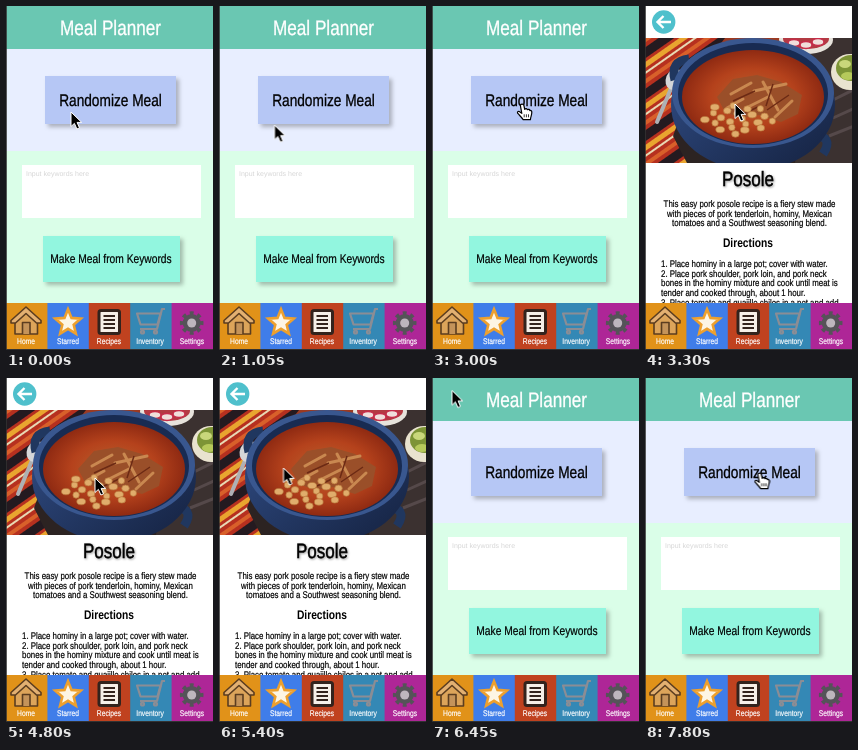
An HTML page that plays this animation: 207x344 px, repeating every 8000 ms.

```html
<!DOCTYPE html>
<html lang="en">
<head>
<meta charset="utf-8">
<title>Meal Planner</title>
<style>
  html, body { margin: 0; width: 100%; height: 100%; overflow: hidden; background: #fff; }
  svg { display: block; width: 100vw; height: 100vh; }

  /* One condensed, slightly heavier cut for all interface type */
  text {
    font-family: "Liberation Sans", Arial, sans-serif;
    text-anchor: middle;
    text-rendering: geometricPrecision;
    stroke: #000;
    stroke-width: .2px;
    transform: scaleX(.82);
    transform-box: fill-box;
    transform-origin: center;
  }
  .title { font-size: 20.9px; fill: #fff; stroke: #fff; stroke-width: .35px; }
  .label { font-size: 16.7px; stroke-width: .3px; }
  .small { font-size: 12.5px; }
  .hint { font-size: 7px; fill: #d6d6d6; stroke: none; text-anchor: start; transform: none; }
  .dish { font-size: 20.7px; stroke-width: .5px; filter: drop-shadow(1.5px 1.5px 1px #0006); }
  .head { font-size: 12.5px; font-weight: bold; stroke: none; }
  .copy text { font-size: 9.6px; }
  .steps text { text-anchor: start; transform-origin: left; }
  .tabs text { font-size: 8.2px; fill: #fff; stroke: #fff; }
  .button { filter: drop-shadow(3px 3px 2px #0004); }

  #recipe, #hand, #arrow, #cursor { animation: 8s -2ms infinite step-end; }
  #recipe { animation-name: recipe; }
  #hand { animation-name: hand; }
  #arrow { animation-name: arrow; }
  #cursor { animation-name: move; }

  @keyframes recipe {
    0%, 80.625%, 100% { visibility: hidden; }
    41.25% { visibility: visible; }
  }
  @keyframes hand {
    0%, 41.25%, 80.625%, 100% { visibility: hidden; }
    15%, 75%, 95.625% { visibility: visible; }
  }
  @keyframes arrow {
    0%, 41.25%, 80.625%, 100% { visibility: visible; }
    15%, 75%, 95.625% { visibility: hidden; }
  }
  /* The pointer is sampled every 150 ms */
  @keyframes move {
    0% { transform: translate(65px, 106px); }
    1.875% { transform: translate(65px, 106px); animation-timing-function: steps(4, start); }
    9.375% { transform: translate(55.5px, 122.5px); }
    13.125% { transform: translate(55.5px, 122.5px); animation-timing-function: steps(6, start); }
    24.375% { transform: translate(55.5px, 102.5px); }
    28.125% { transform: translate(55.5px, 102.5px); animation-timing-function: steps(2, start); }
    31.875% { transform: translate(68px, 103.5px); animation-timing-function: steps(4, start); }
    39.375% { transform: translate(90px, 98px); }
    60% { transform: translate(89px, 100px); }
    61.875% { transform: translate(89px, 100px); animation-timing-function: steps(2, start); }
    65.625% { transform: translate(86px, 130px); animation-timing-function: steps(4, start); }
    73.125% { transform: translate(43px, 50px); animation-timing-function: steps(2, start); }
    76.875% { transform: translate(20.5px, 15.5px); }
    80.625% { transform: translate(20px, 12.5px); }
    88.125% { transform: translate(20px, 12.5px); animation-timing-function: steps(6, start); }
    99.375%, 100% { transform: translate(114.5px, 95px); }
  }
</style>
</head>
<body>
<svg viewBox="0 0 207 344" preserveAspectRatio="none">
  <defs>
    <clipPath id="photo"><path d="M0 32H207V157H0Z"/></clipPath>
    <radialGradient id="stew">
      <stop offset="0" stop-color="#b9632f"/>
      <stop offset=".6" stop-color="#b5421c"/>
      <stop offset="1" stop-color="#8f2a12"/>
    </radialGradient>
    <linearGradient id="pot" x2="1" y2="1">
      <stop offset="0" stop-color="#33508a"/>
      <stop offset="1" stop-color="#14213f"/>
    </linearGradient>
    <pattern id="cloth" width="34" height="34" patternUnits="userSpaceOnUse" patternTransform="rotate(-35)">
      <path fill="#b6301f" d="M0 0H34V34H0Z"/>
      <path fill="#241a20" d="M0 0H34V9H0Z"/>
      <path fill="#e9a52f" d="M0 12H34V17H0Z"/>
      <path fill="#e8d9b4" d="M0 20H34V22H0Z"/>
      <path fill="#d8602a" d="M0 26H34V30H0Z"/>
    </pattern>
  </defs>

  <g id="home">
    <path fill="#6ac7b2" d="M0 0H207V43H0Z"/>
    <path fill="#e8eeff" d="M0 43H207V146H0Z"/>
    <path fill="#dafee8" d="M0 145H207V298H0Z"/>
    <text class="title" x="104.5" y="29">Meal Planner</text>
    <path class="button" fill="#b6c7f5" d="M39 70H170V118H39Z"/>
    <text class="label" x="104.5" y="100">Randomize Meal</text>
    <path fill="#fff" d="M16 159H195V212H16Z"/>
    <text class="hint" x="20" y="170">Input keywords here</text>
    <path class="button" fill="#92f6df" d="M37 230H174V276H37Z"/>
    <text class="small" x="105" y="256.7">Make Meal from Keywords</text>
  </g>

  <g id="recipe">
    <path fill="#fff" d="M0 0H207V298H0Z"/>
    <circle cx="18.7" cy="16" r="11.7" fill="#4fc0cc"/>
    <path d="M18.5 10L12.5 16l6 6M12.5 16H26" fill="none" stroke="#fff" stroke-width="2.4"/>

    <g clip-path="url(#photo)">
      <path fill="#2c2322" d="M0 32H207V157H0Z"/>
      <path fill="url(#cloth)" d="M0 32H82L48 75 28 130 42 157H0Z"/>
      <path fill="#3b3130" d="M165 32H207V157H150Z"/>
      <path fill="#9c3a22" d="M80 32H140L150 45H70Z"/>
      <path fill="none" stroke="#55494a" stroke-width="3" d="M186 95L212 82M188 112L212 101M184 130L212 119"/>
      <ellipse cx="161" cy="34" rx="27" ry="14" fill="#e7e3dc"/>
      <ellipse cx="161" cy="33" rx="23" ry="10" fill="#b33a43"/>
      <g fill="#f0dedb" stroke="#c72c4a" stroke-width="1.5">
        <ellipse cx="149" cy="37" rx="6" ry="3.5"/>
        <ellipse cx="161" cy="39" rx="6" ry="3.5"/>
        <ellipse cx="173" cy="36" rx="6" ry="3.5"/>
      </g>
      <ellipse cx="205" cy="66" rx="19" ry="18" fill="#e9e3cf"/>
      <ellipse cx="206" cy="62" rx="15" ry="13" fill="#7d9436"/>
      <ellipse cx="200" cy="58" rx="6" ry="4" fill="#c9d77b"/>
      <ellipse cx="203" cy="70" rx="7" ry="4" fill="#b6c95b"/>
      <path stroke="#aeb0b4" stroke-width="4" stroke-linecap="round" d="M27 80L12 116"/>
      <ellipse cx="29" cy="73" rx="8" ry="11" fill="#d5d6d8" transform="rotate(22 29 73)"/>

      <path fill="none" stroke="#20375f" stroke-width="9" d="M44 53Q25 55 30 74M166 128Q190 130 178 148"/>
      <ellipse cx="108" cy="99" rx="82" ry="65" fill="url(#pot)"/>
      <ellipse cx="108" cy="87" rx="81" ry="55" fill="#39578f"/>
      <ellipse cx="108" cy="88" rx="75" ry="51" fill="#182b52"/>
      <ellipse cx="108" cy="91" rx="71" ry="47" fill="url(#stew)"/>
      <path fill="#9a4f29" d="M72 91L88 73 112 69 136 76 157 89 153 108 136 116 114 109 96 112 80 106Z"/>
      <path fill="none" stroke="#c98850" stroke-width="3" stroke-linecap="round" d="M86 88l20-11M109 85l32-7M103 101l22-11M130 111l17-16M118 76l15 28M82 102l16-9"/>
      <path fill="none" stroke="#6c2a14" stroke-width="1.5" d="M88 95l22-10M122 104l22-15M128 78l-7 22M98 108l17-8"/>
      <g id="corn" fill="#e0ad6c" stroke="#b9773b" stroke-width=".7"></g>
    </g>

    <text class="dish" x="103" y="180">Posole</text>
    <g class="copy">
      <text x="104.5" y="201">This easy pork posole recipe is a fiery stew made</text>
      <text x="104.5" y="210.7">with pieces of pork tenderloin, hominy, Mexican</text>
      <text x="104.5" y="220.4">tomatoes and a Southwest seasoning blend.</text>
    </g>
    <text class="head" x="103" y="241">Directions</text>
    <g class="copy steps">
      <text x="16" y="261">1. Place hominy in a large pot; cover with water.</text>
      <text x="16" y="270.7">2. Place pork shoulder, pork loin, and pork neck</text>
      <text x="16" y="280.4">bones in the hominy mixture and cook until meat is</text>
      <text x="16" y="290.1">tender and cooked through, about 1 hour.</text>
      <text x="16" y="299.8">3. Place tomato and guajillo chiles in a pot and add</text>
    </g>
  </g>

  <g class="tabs">
    <path fill="#e19219" d="M0 297H42V344H0Z"/>
    <path fill="#3f7de9" d="M41.4 297H83V344H41.4Z"/>
    <path fill="#c0421f" d="M82.8 297H125V344H82.8Z"/>
    <path fill="#3488b5" d="M124.2 297H166V344H124.2Z"/>
    <path fill="#ae2697" d="M165.6 297H207V344H165.6Z"/>

    <g stroke="#5b3d20" stroke-width="1.6" stroke-linejoin="round">
      <path fill="#dca45a" d="M9 314V328H31.5V314L20 303Z"/>
      <path fill="#e3b071" d="M5 314.5L20 301 35 314.5V317H30.5L20 307.500 9.500 317H5Z"/>
      <path fill="#c4935a" d="M16.500 328V316.500H24V328"/>
    </g>
    <path id="star" fill="#fdf5e4" stroke="#eda02e" stroke-width="2.6"/>
    <rect x="93" y="304.500" width="20.500" height="23" rx="2" fill="#f6efe8" stroke="#33231d" stroke-width="3"/>
    <path d="M97.500 310H109M97.500 314H109M97.500 318H109M97.500 322H109" stroke="#33231d" stroke-width="1.800"/>
    <g fill="none" stroke="#8b8d95" stroke-width="2.200" stroke-linejoin="round">
      <path d="M131 307.500H154.500L151.500 318.500H134.500Z"/>
      <path d="M159 303H156L151 323H134"/>
      <circle cx="136.500" cy="326" r="1.500"/>
      <circle cx="149.500" cy="326" r="1.500"/>
    </g>
    <g fill="none" stroke="#555358">
      <circle cx="185.700" cy="317" r="9.800" stroke-width="4" pathLength="80" stroke-dasharray="5 5" stroke-dashoffset="2.500"/>
      <circle cx="185.700" cy="317" r="6.500" stroke-width="5"/>
      <circle cx="185.700" cy="317" r="4.500" fill="#bdb6bd" stroke="none"/>
    </g>

    <text x="20" y="337.800">Home</text>
    <text x="62" y="337.800">Starred</text>
    <text x="103" y="337.800">Recipes</text>
    <text x="144" y="337.800">Inventory</text>
    <text x="186" y="337.800">Settings</text>
  </g>

  <path fill="#333" d="M0 0H.8V344H0ZM0 343H207V344H0Z"/>

  <g id="cursor">
    <path id="arrow" fill="#000" stroke="#fff" d="M0 0V14.500L3.400 11.400 5.900 17 8.500 15.900 6.100 10.400H10.700Z"/>
    <g id="hand" stroke="#000" stroke-linejoin="round">
      <path fill="#fff" stroke-width="1.200" d="M-1.600 1.600C-1.600-.4 1.500-.4 1.900 1.300L2.700 5.300C3.600 4.300 5 4.600 5.400 5.700 6.400 4.900 7.600 5.400 7.900 6.600 9 6 9.900 6.900 9.800 8.300 9.800 11.300 8.700 12.500 8.400 15.700H1.200C0 13.500-2.400 11.600-4.400 9.200-5 7.700-3.400 6.700-2.100 7.900L-.2 9.300Z"/>
      <path fill="none" stroke-width=".8" d="M2.200 10.300v3M4.400 10.300v3M6.500 10.300v3"/>
    </g>
  </g>
</svg>
<script>
  const byId = id => document.getElementById(id);

  const points = Array.from({ length: 10 }, (_, i) => {
    const r = i % 2 ? 6 : 13.5, a = i * Math.PI / 5;
    return (62 + r * Math.sin(a)).toFixed(1) + " " + (316.8 - r * Math.cos(a)).toFixed(1);
  });
  byId("star").setAttribute("d", "M" + points.join("L") + "Z");

  // Hominy kernels gather below and to the left of the meat
  byId("corn").innerHTML = Array.from({ length: 22 }, (_, i) => {
    const a = i * 2.4, r = Math.sqrt((i + .5) / 22);
    const x = 92 + 36 * r * Math.cos(a), y = 113 + 16 * r * Math.sin(a);
    return `<ellipse cx="${x.toFixed(1)}" cy="${y.toFixed(1)}" rx="${3.2 + i % 3 * .6}" ry="3.2"/>`;
  }).join("");
</script>
</body>
</html>
```
